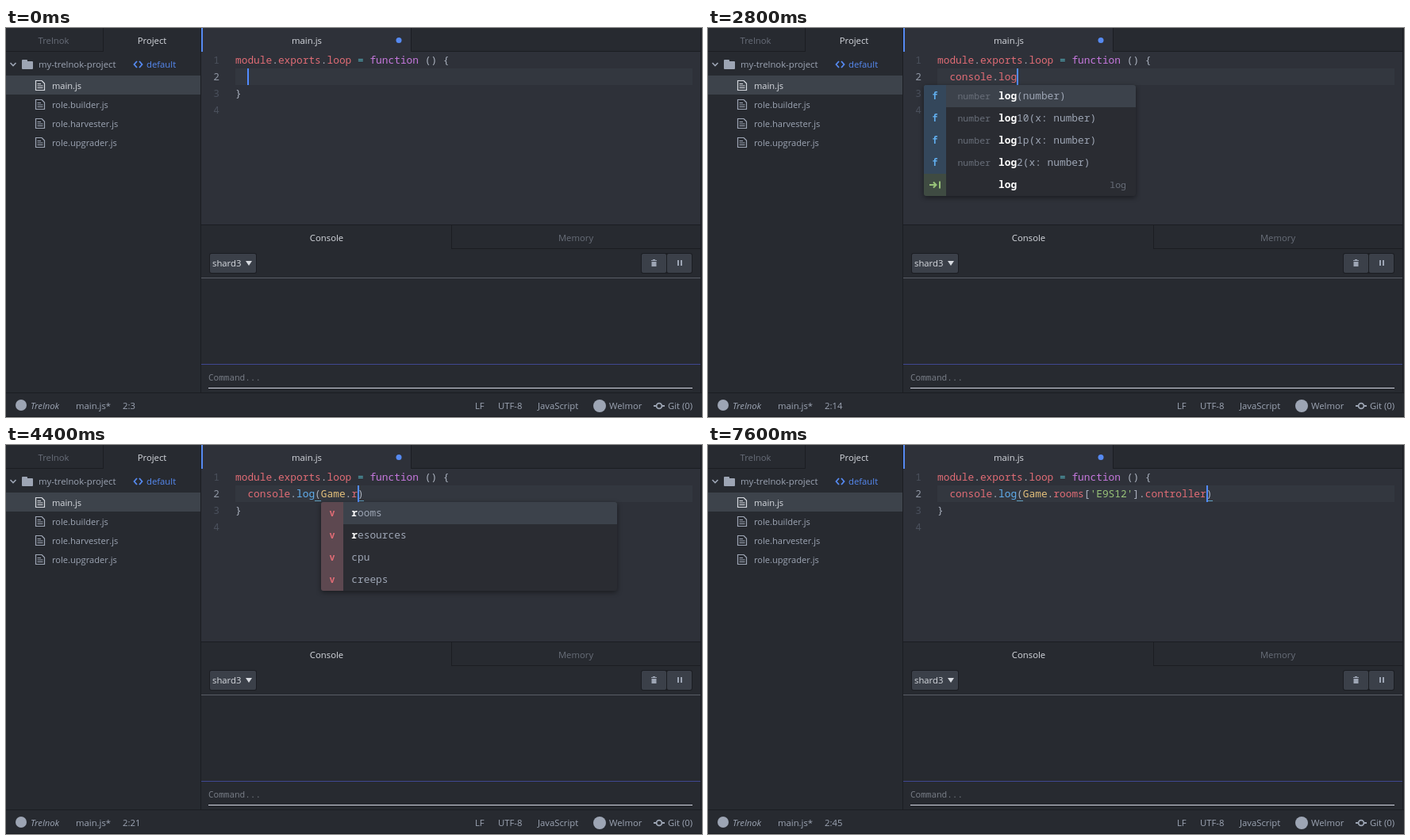
Recreate the animation shown at these times as an HTML page with a canvas. Size 877x491 px, loop 8 s.

```html
<!DOCTYPE html>
<html lang="en">
<head>
<meta charset="utf-8">
<title>Editor typing</title>
<style>
html, body { margin: 0; width: 100%; height: 100%; overflow: hidden; background: #272a30; }
canvas { display: block; }
</style>
</head>
<body>
<canvas id="stage" width="877" height="491"></canvas>
<script>
const ctx = document.getElementById('stage').getContext('2d');
const LOOP = 8000;
const CW = 7.7, CODE_X = 289, LINE_Y = 30, LINE_H = 21;
const UI = '"Open Sans", "Noto Sans", sans-serif';
const MONO = '"Noto Sans Mono", "DejaVu Sans Mono", monospace';
const CODE = '12.83px ' + MONO, SMALL = '11.55px ' + MONO;
const C = {
  panel: '#272a30', editor: '#2e3139', line: '#33373f', edge: '#1b1d22', row: '#3d434b',
  blue: '#568af2', text: '#9da5b4', dim: '#686e79', bright: '#d7dae0',
  plain: '#abb2bf', red: '#e06c75', gold: '#e5c07b', func: '#61afef',
  key: '#c678dd', op: '#56b6c2', str: '#98c379', popup: '#2a2c32'
};
const ICONS = {
  f: ['#34475b', C.func], v: ['#5d4850', C.red], s: ['#3f4b42', C.str]
};

// Popup: word start column, right edge, rows of [icon, type, label, note]
const consolePop = { col: 8, right: 566, rows: [
  ['f', '', 'assert(test: bool)'], ['f', '', 'count(label: string)'], ['f', '', 'error(text: string)'],
  ['f', '', 'info(text: string)'], ['f', '', 'log(text: string)']] };
const logPop = { col: 8, right: 539, rows: [
  ['f', 'number', 'log(number)'], ['f', 'number', 'log10(x: number)'], ['f', 'number', 'log1p(x: number)'],
  ['f', 'number', 'log2(x: number)'], ['s', '', 'log', 'log']] };
const constPop = { col: 12, right: 702, rows: [
  ['v', '', 'Game'], ['v', 'number', 'GCL_POW'], ['v', 'number', 'GCL_MULTIPLY']] };
const gamePop = { col: 12, right: 601, rows: [['v', '', 'Game']] };
const fieldPop = { col: 17, right: 770, rows: [
  ['v', '', 'rooms'], ['v', '', 'resources'], ['v', '', 'cpu'], ['v', '', 'creeps']] };
const roomsPop = { col: 17, right: 770, rows: fieldPop.rows.slice(0, 1) };
const roomPop = { col: 32, right: 871, rows: [
  ['v', '', 'controller'], ['v', '', 'energyAvailable'], ['v', '', 'memory'], ['v', '', 'name']] };
const ctrlPop = { col: 32, right: 871, rows: roomPop.rows.slice(0, 1) };

const LOG = 'console.log(', ROOMS = LOG + 'Game.rooms', ROOM = ROOMS + "['E9S12']";
// [start, before caret, after caret, popup, caret hidden]
const STEPS = [
  [0, ''], [200, '', '', null, true], [600, ''], [1000, '', '', null, true],
  [1400, 'c'], [1600, 'con'], [1800, 'conso'], [2000, 'consol'], [2200, 'console'],
  [2400, 'console.', '', consolePop], [2600, 'console.l', '', logPop], [2800, 'console.log', '', logPop],
  [3000, LOG, ')'], [3200, LOG + 'G', ')', constPop], [3400, LOG + 'Gam', ')', gamePop],
  [3600, LOG + 'Game', ')', gamePop], [4000, LOG + 'Game', ')', gamePop, true],
  [4200, LOG + 'Game.', ')', fieldPop], [4400, LOG + 'Game.r', ')', fieldPop],
  [4600, LOG + 'Game.ro', ')', roomsPop], [4800, LOG + 'Game.room', ')', roomsPop],
  [5000, ROOMS, ')'], [5400, ROOMS, ')', null, true],
  [5800, ROOMS + "['", "'])"], [6200, ROOMS + "['E9S", "'])"],
  [6400, ROOM, ')'], [6600, ROOM, ')', null, true],
  [6800, ROOM + '.', ')', roomPop], [7000, ROOM + '.c', ')', ctrlPop],
  [7400, ROOM + '.contro', ')', ctrlPop], [7600, ROOM + '.controller', ')']
];

function box(x, y, w, h, color) {
  ctx.fillStyle = color;
  ctx.fillRect(x, y, w, h);
}

function round(x, y, w, h, r, color) {
  ctx.fillStyle = color;
  ctx.beginPath();
  ctx.roundRect(x, y, w, h, r);
  ctx.fill();
}

function dot(x, y, r, color) {
  ctx.fillStyle = color;
  ctx.beginPath();
  ctx.arc(x, y, r, 0, Math.PI * 2);
  ctx.fill();
}

function path(color, width, ...lines) {
  ctx.strokeStyle = color;
  ctx.lineWidth = width;
  ctx.beginPath();
  for (const pts of lines) {
    for (let i = 0; i < pts.length; i += 2) ctx[i ? 'lineTo' : 'moveTo'](pts[i], pts[i + 1]);
  }
  ctx.stroke();
}

function text(str, x, y, color, font = '11.3px ' + UI, align = 'left') {
  ctx.font = font;
  ctx.textAlign = align;
  ctx.fillStyle = color;
  ctx.fillText(str, x, y);
}

const label = (str, x, y, color) => text(str, x, y, color, undefined, 'center');

function fileRow(name, i) {
  const y = 60 + i * 24, color = i ? C.text : C.bright;
  if (!i) box(0, y, 245, 24, C.row);
  path(color, 1.2, [45, y + 6.5, 37.5, y + 6.5, 37.5, y + 18.5, 48.5, y + 18.5, 48.5, y + 10, 45, y + 6.5],
    [39.5, y + 10.5, 44, y + 10.5], [39.5, y + 13, 46.5, y + 13], [39.5, y + 15.5, 46.5, y + 15.5]);
  text(name, 58, y + 17, color, '11.1px ' + UI);
}

function sidebar() {
  box(0, 0, 877, 491, C.panel);
  box(0, 29, 123, 1, C.edge);
  box(122, 0, 1, 30, C.edge);
  label('Trelnok', 60, 20, C.dim);
  label('Project', 184, 20, C.bright);
  path(C.text, 1.6, [5.5, 44, 9, 47.5, 12.5, 44]);
  round(20, 40, 7, 4, 1, C.text);
  round(20, 42, 14, 10, 1, C.text);
  text('my-trelnok-project', 41, 50, C.text);
  path(C.blue, 1.8, [165, 42, 161.5, 46, 165, 50], [168, 42, 171.5, 46, 168, 50]);
  text('default', 177, 50, C.blue);
  ['main.js', 'role.builder.js', 'role.harvester.js', 'role.upgrader.js'].forEach(fileRow);
  box(245, 0, 1, 460, C.edge);
}

function consolePanel() {
  box(246, 248, 630, 1, C.edge);
  box(561, 249, 1, 30, C.edge);
  box(561, 278, 315, 1, C.edge);
  label('Console', 404, 269, C.bright);
  label('Memory', 718, 269, C.dim);
  round(256, 284, 60, 26, 3, C.edge);
  round(257, 285, 58, 24, 2, '#3b4049');
  text('shard3', 260, 301, C.bright);
  ctx.fillStyle = C.bright;
  ctx.beginPath();
  ctx.moveTo(302, 294);
  ctx.lineTo(310, 294);
  ctx.lineTo(306, 300);
  ctx.fill();
  round(800, 284, 65, 26, 3, C.edge);
  round(801, 285, 31, 24, 2, '#3b4049');
  round(833, 285, 31, 24, 2, '#3b4049');
  box(813, 293, 7, 1, C.text);
  box(815, 292, 3, 1, C.text);
  box(813.5, 295, 6, 6, C.text);
  box(846, 293, 2, 7, C.text);
  box(850, 293, 2, 7, C.text);
  box(246, 315, 629, 1, '#595d66');
  box(246, 424, 629, 1, '#3f4791');
  text('Command...', 255, 445, '#767b84', '11px ' + MONO);
  box(255, 454, 610, 1, '#d3d6e2');
}

function statusBar(col) {
  box(0, 460, 877, 1, C.edge);
  dot(19, 476, 7, C.text);
  text('Trelnok', 31, 481, C.text, 'italic 11.3px ' + UI);
  text('main.js*', 88, 481, C.text);
  text('2:' + col, 147, 481, C.text);
  text('LF', 591, 481, C.text);
  text('UTF-8', 620, 481, C.text);
  text('JavaScript', 670, 481, C.text);
  dot(748, 477, 8, C.text);
  text('Welmor', 760, 481, C.text);
  path(C.text, 1.8, [816, 477, 819.5, 477], [826.5, 477, 830, 477]);
  ctx.beginPath();
  ctx.arc(823, 477, 3.4, 0, Math.PI * 2);
  ctx.stroke();
  text('Git (0)', 834, 481, C.text);
  box(0, 490, 877, 1, C.edge);
}

function tokenColor(word, prev, next) {
  if (/^'/.test(word)) return C.str;
  if (word === 'function') return C.key;
  if (word === '=') return C.op;
  if (!/^\w/.test(word)) return C.plain;
  if (word === 'Game') return C.gold;
  if (word === 'log' && next === '(') return C.func;
  return prev === '.' || next === '.' ? C.red : C.plain;
}

function codeLine(str, row, indent = 0) {
  for (const m of str.matchAll(/'[^']*'|\w+|[^\w\s]/g)) {
    const color = tokenColor(m[0], str[m.index - 1], str[m.index + m[0].length]);
    text(m[0], CODE_X + (indent + m.index) * CW, LINE_Y + row * LINE_H + 15, color, CODE);
  }
}

const colX = n => CODE_X + (n + 2) * CW;

function brackets(before, after) {
  const pair = before.endsWith(']') ? [before.lastIndexOf('['), before.length - 1]
    : after[0] === ')' ? [before.indexOf('('), before.length] : [];
  for (const n of pair) box(Math.round(colX(n)), 70, 8, 1, '#61a0c0');
}

function editor(before, after, hidden) {
  box(246, 0, 629, 248, C.editor);
  box(511, 0, 364, 30, C.panel);
  box(510, 0, 1, 30, C.edge);
  box(510, 29, 365, 1, C.edge);
  box(246, 0, 2, 30, C.blue);
  label('main.js', 379, 20, C.bright);
  dot(495, 15.5, 3.5, C.blue);
  box(CODE_X, 51, 576, 21, C.line);
  for (let i = 0; i < 4; i++) {
    text(i + 1, 269, LINE_Y + i * LINE_H + 15, i === 1 ? '#8f96a3' : '#4a505c', CODE, 'right');
  }
  codeLine('module.exports.loop = function () {', 0);
  codeLine(before + after, 1, 2);
  codeLine('}', 2);
  brackets(before, after);
  if (!hidden) box(Math.round(colX(before.length)), 51, 2, 21, '#528bff');
}

function popupRow([icon, type, name, note], y, left, x, prefix, right) {
  const [bg, fg] = ICONS[icon];
  box(left, y, 28, 28, bg);
  if (icon === 's') {
    path(fg, 2, [left + 7, y + 14, left + 15, y + 14], [left + 12, y + 10.5, left + 15.5, y + 14, left + 12, y + 17.5],
      [left + 20, y + 9.5, left + 20, y + 18.5]);
  } else {
    text(icon, left + 14, y + 18, fg, 'bold ' + SMALL, 'center');
  }
  text(type, x - 10, y + 18, C.dim, SMALL, 'right');
  const n = name.startsWith(prefix) ? prefix.length : 0;
  text(name.slice(0, n), x, y + 18, '#fff', 'bold ' + CODE);
  text(name.slice(n), x + n * CW, y + 18, C.text, CODE);
  if (note) text(note, right - 12, y + 18, C.dim, SMALL, 'right');
}

function popup({ col, right, rows }, before) {
  const x = colX(col), chars = Math.max(...rows.map(r => r[1].length));
  const left = Math.round(x - 38 - (chars && chars * 6.93 + 14));
  const w = right - left, h = rows.length * 28;
  ctx.save();
  ctx.shadowColor = 'rgba(0,0,0,.45)';
  ctx.shadowBlur = 6;
  ctx.shadowOffsetY = 2;
  round(left, 72, w, h, 3, C.popup);
  ctx.restore();
  ctx.save();
  ctx.beginPath();
  ctx.roundRect(left, 72, w, h, 3);
  ctx.clip();
  box(left, 72, w, 28, '#3c424b');
  rows.forEach((row, i) => popupRow(row, 72 + i * 28, left, x, before.slice(col), right));
  ctx.restore();
}

function draw(now) {
  const t = now % LOOP;
  const [, before, after = '', pop, hidden] = STEPS.findLast(s => s[0] <= t);
  sidebar();
  editor(before, after, hidden);
  consolePanel();
  box(875, 0, 1, 460, C.edge);
  statusBar(before.length + 3);
  if (pop) popup(pop, before);
}

const start = performance.now();
function tick() {
  draw(performance.now() - start);
  requestAnimationFrame(tick);
}
tick();
</script>
</body>
</html>
```
